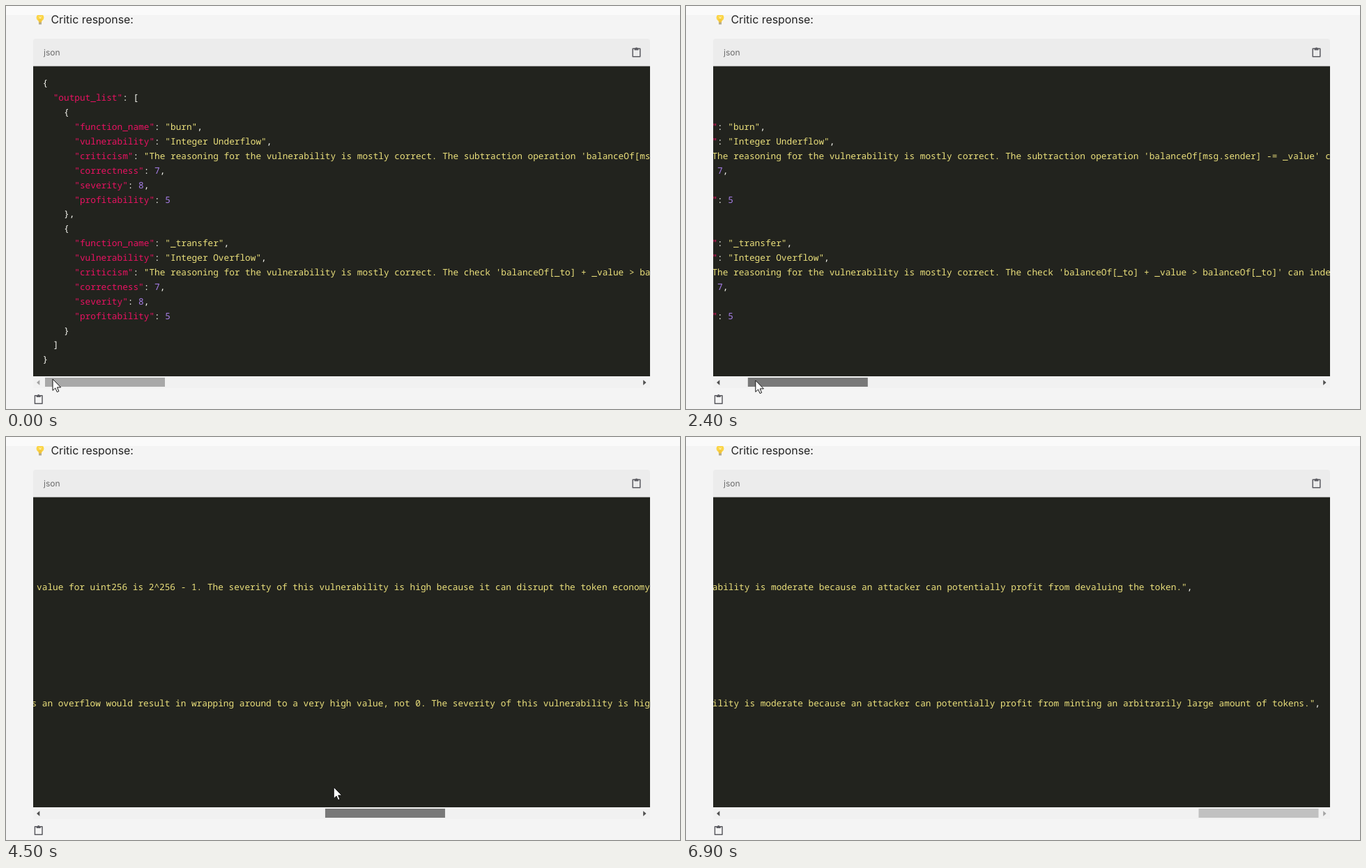
Write an HTML page that moves like this. It is 967 px wide and 579 px high and loops after 7000 ms.

```html
<!DOCTYPE html>
<html lang="en">
<head>
<meta charset="utf-8">
<title>Critic response</title>
<style>
html, body { margin: 0; width: 100%; height: 100%; overflow: hidden; background: #f4f4f4; }
svg { display: block; }
text { font-family: Inter, sans-serif; text-rendering: geometricPrecision; }
#code text { font: 12.75px "Noto Sans Mono", monospace; fill: #f8f8f2; font-variant-ligatures: none; white-space: pre; }
#code .key { fill: #ea1262; }
#code .str { fill: #ece17c; }
#code .num { fill: #a87fea; }
</style>
</head>
<body>
<svg width="967" height="579" viewBox="0 0 967 579">
  <defs>
    <clipPath id="pane"><rect x="39" y="86.5" width="885.5" height="445.5"/></clipPath>
    <g id="paste">
      <path d="M1.2 2.7H11.8V14.3H1.2Z" fill="none" stroke="#5c5c62" stroke-width="1.5" stroke-linejoin="round"/>
      <path d="M3.5 2H5a1.6 1.6 0 0 1 3 0H9.5V5H3.5Z" fill="#5c5c62"/>
    </g>
  </defs>
  <g>
    <circle cx="49" cy="16.5" r="5.4" fill="#fbd548"/>
    <path d="M46.3 19H51.7L51 24H47Z" fill="#f3c63c"/>
    <path d="M47 23.5H51V26.5H47Z" fill="#b5aa8c"/>
    <path d="M47.5 15L49 18 50.5 15" fill="none" stroke="#fff3b8"/>
  </g>
  <rect width="967" height="13" fill="#fafafa"/>
  <text x="64.5" y="25" font-size="15.9" fill="#222">Critic response:</text>
  <path d="M39 86.5V51a4 4 0 0 1 4-4H920a4 4 0 0 1 4 4V86.5Z" fill="#ececec"/>
  <text x="54" y="71" font-size="12" fill="#6b6b6b">json</text>
  <use href="#paste" x="898" y="58.5"/>
  <use href="#paste" x="40.2" y="557"/>

  <rect x="39" y="86.5" width="885" height="445.5" fill="#22231e"/>
  <g clip-path="url(#pane)"><g id="code"></g></g>

  <rect x="39" y="532" width="885" height="17" fill="#f1f1f1"/>
  <path id="left" d="M44 541L48.3 537.3V544.7Z"/>
  <path id="right" d="M918.5 541L914.2 537.3V544.7Z"/>
  <rect id="thumb" y="534" width="172" height="13"/>
  <path id="cursor" d="M0 0V16.4L3.8 12.9 6.3 18.6 8.8 17.5 6.4 11.9H11.6Z" fill="#fff" stroke="#111"/>
</svg>
<script>
const $ = id => document.getElementById(id);
const LOOP = 7000, STEP = 100, MAX_SCROLL = 3480, THUMB_MIN = 56, THUMB_RANGE = 679.5;
const PRESS = 600, RELEASE = 6500;

const finding = (name, kind, criticism) => `    {
      "function_name": "${name}",
      "vulnerability": "Integer ${kind}",
      "criticism": "The reasoning for the vulnerability is mostly correct. ${criticism}",
      "correctness": 7,
      "severity": 8,
      "profitability": 5
    }`;
const profit = "The profitability is moderate because an attacker can potentially profit from";
const severity = "The severity of this vulnerability is high because it can";
const source = `{
  "output_list": [
${finding("burn", "Underflow", `The subtraction operation 'balanceOf[msg.sender] -= _value' can indeed lead to an integer underflow if _value is very large. However, the statement 'close to 2^256' is incorrect as the maximum value for uint256 is 2^256 - 1. ${severity} disrupt the token economy by allowing an attacker to have more tokens than intended. ${profit} devaluing the token.`)},
${finding("_transfer", "Overflow", `The check 'balanceOf[_to] + _value > balanceOf[_to]' can indeed lead to an integer overflow if _value is very large. However, the statement 'resulting in balanceOf[_to] being 0' is incorrect as an overflow would result in wrapping around to a very high value, not 0. ${severity} lead to token inflation and devaluation. ${profit} minting an arbitrarily large amount of tokens.`)}
  ]
}`;

const highlight = line => line.replace(/>/g, "&gt;").replace(/("[^"]*")(?=:)|("[^"]*")|\d+/g,
  (token, key, str) => `<tspan class="${key ? "key" : str ? "str" : "num"}">${token}</tspan>`);

$("code").innerHTML = source.split("\n").map((line, i) => {
  const body = line.trimStart(), indent = line.length - body.length;
  return `<text x="${52.4 + indent * 7.65}" y="${115.4 + i * 20.89}">${highlight(body)}</text>`;
}).join("");

// time, scroll, scroll speed, grab offset, cursor y
const keys = [
  [0, 0, 0, 11, 536],
  [600, 0, 0, 11, 536],
  [1100, 20.7, .05, 11, 536],
  [2400, 168, .2, 11, 538],
  [3500, 1101.5, .95, 12.5, 508],
  [4500, 2058.5, .95, 12.3, 503],
  [5600, 3056.5, .9, 11, 512],
  [6070, MAX_SCROLL, .9, 11, 514],
  [LOOP, MAX_SCROLL, 0, 11, 514],
];

function pose(t) {
  const i = keys.findIndex(k => k[0] > t);
  const [t0, s0, v0, dx0, y0] = keys[i - 1], [t1, s1, v1, dx1, y1] = keys[i];
  const d = t1 - t0, u = (t - t0) / d, ease = u * u * (3 - 2 * u);
  const scroll = s0 + (s1 - s0) * ease + d * u * (1 - u) * (v0 * (1 - u) - v1 * u);
  return {
    scroll: s0 === s1 ? s0 : scroll,
    dx: dx0 + (dx1 - dx0) * u,
    y: y0 + (y1 - y0) * u,
  };
}

function draw(now) {
  const t = Math.floor(now % LOOP / STEP) * STEP;
  const { scroll, dx, y } = pose(t);
  const thumbX = THUMB_MIN + scroll / MAX_SCROLL * THUMB_RANGE;
  $("code").setAttribute("transform", `translate(${-scroll})`);
  $("thumb").setAttribute("x", thumbX);
  $("thumb").setAttribute("fill", t < PRESS ? "#a8a8a8" : t < RELEASE ? "#787878" : "#c1c1c1");
  $("left").setAttribute("fill", scroll > 0 ? "#505050" : "#a3a3a3");
  $("right").setAttribute("fill", scroll < MAX_SCROLL ? "#505050" : "#a3a3a3");
  $("cursor").setAttribute("transform", `translate(${thumbX + dx} ${y})`);
  $("cursor").setAttribute("visibility", t < RELEASE ? "visible" : "hidden");
}

const start = performance.now();
function tick() {
  draw(performance.now() - start);
  requestAnimationFrame(tick);
}
tick();
</script>
</body>
</html>
```
